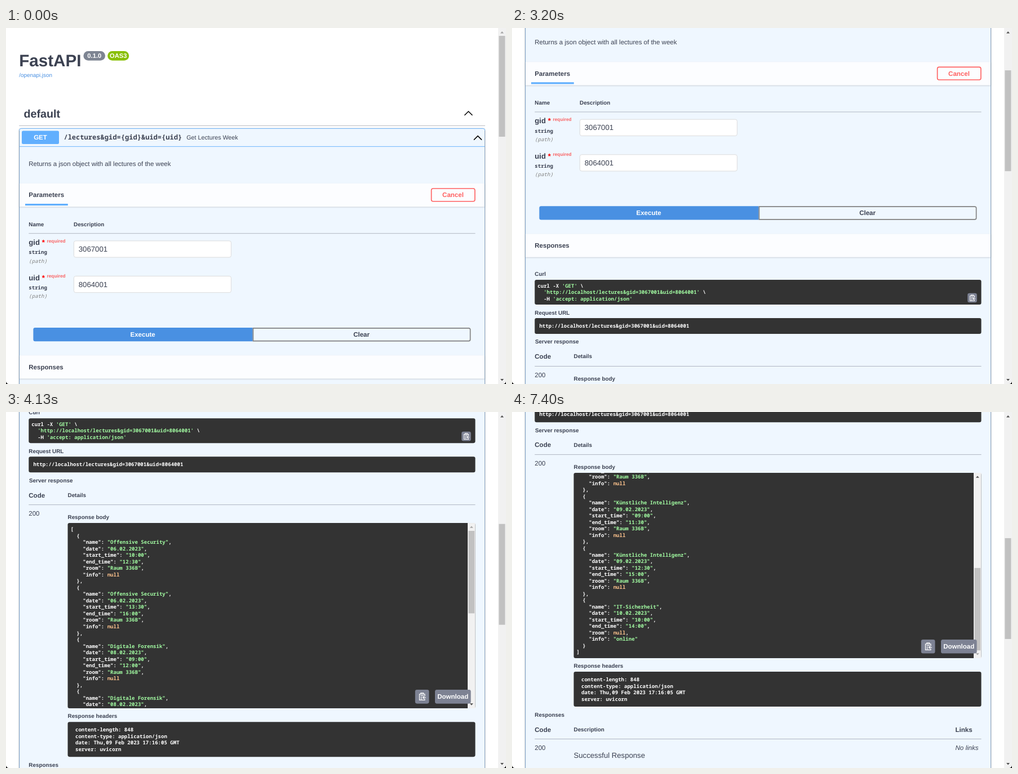
An HTML page that plays this animation: 887x632 px, repeating every 7.47 s.

```html
<!DOCTYPE html>
<html lang="en">
<head>
<meta charset="utf-8">
<title>FastAPI docs</title>
<style>
html, body { margin: 0; width: 100%; height: 100%; overflow: hidden; background: #fff; }
svg { display: block; width: 887px; height: 632px; }
text { font-family: "Liberation Sans", Arial, sans-serif; fill: #3b4151; text-rendering: geometricPrecision; }
.b { font-weight: 700; }
.i { font-style: italic; }
.mid { text-anchor: middle; }
.mono { font-family: "Noto Sans Mono", monospace; }
.white { fill: #fff; }
.str { fill: #a2fca2; }
.nul { fill: #fcc28c; }
.red { fill: #ff6060; }
.req { fill: #f96363; }
.link { fill: #4990e2; }
.gray { fill: #808080; }
</style>
</head>
<body>
<svg id="stage" viewBox="0 0 887 632"></svg>
<script>
const LOOP = 7470, STEP = 1000 / 15;
const SCALE = 0.8232, LINE = 14 * SCALE, CHAR = 5.43, MONO = CHAR / 0.6;
const PAGE_END = 740.6, BODY_END = 349.6, LOADER = 100 * SCALE;
const px = n => +(n * SCALE).toFixed(2);

// ---- drawing helpers ----
const esc = s => s.replace(/&/g, '&amp;');
const text = (s, x, y, size, cls = '') =>
  `<text x="${x}" y="${y}" font-size="${size}" class="${cls}">${s}</text>`;
const sans = (s, x, y, css, cls) => text(esc(s), x, y, px(css), cls);
const code = (s, x, y, cls = 'mono b white') => text(s, x, y, MONO, cls);
const rect = (x, y, w, h, fill, rx = 0, more = '') =>
  `<rect x="${x}" y="${y}" width="${w}" height="${h}" fill="${fill}" rx="${rx}" ${more}/>`;
const rule = (y, x = 40.3, x2 = 832.5, color = '#3b4151" stroke-opacity=".4') =>
  `<path d="M${x} ${y}H${x2}" stroke="${color}" stroke-width=".9"/>`;
const chevron = (x, y) =>
  `<path d="M${x - 7} ${y + 3.6}l7 -7 7 7" fill="none" stroke="#000" stroke-width="1.5"/>`;
const span = (s, cls) => `<tspan class="${cls}">${s}</tspan>`;
const arrow = (id, x, y, dir) =>
  `<path id="${id}" d="M${x - 3} ${y + 1.6 * dir}h6l-3 ${-3.4 * dir}z" fill="#505050"/>`;
const bar = y => rect(24, y + 1, 825, 41.3, '#000', 0, 'opacity=".16" filter="url(#soft)"') +
  rect(24, y, 825, 41.3, '#fcfdff');
const clip = (x, y, k) => `<g transform="translate(${x} ${y}) scale(${k})" fill="none" stroke="#fff" stroke-width="1.3">
  <path d="M5 -1V-5H-5V6H5V4M-2.5 -5V-7H2.5V-5M-3 -2H3M-3 1H0M-3 4H0M7 1.5H1.5M4 -1L1.5 1.5L4 4"/></g>`;

function param(name, value, y) {
  return sans(name, 40.3, y, 16, 'b') +
    `<text x="63.8" y="${y}" font-size="${px(16)}" class="b" style="fill:#f00">*</text>` +
    sans('required', 72.6, y - 4.5, 10, 'b req') +
    code('string', 40.3, y + 16.4, 'mono b') +
    code('(path)', 40.3, y + 31.6, 'mono i gray') +
    rect(120.4, y - 7.1, 279, 29.2, '#fff', 3.3, 'stroke="#d9d9d9" stroke-width=".9"') +
    `<g style="--c:#000">${sans(value, 128.8, y + 12, 16)}</g>`;
}

// ---- response data ----
const room = 'Raum 336B';
const lectures = [
  ['Offensive Security', '06.02.2023', '10:00', '12:30', room, null],
  ['Offensive Security', '06.02.2023', '13:30', '16:00', room, null],
  ['Digitale Forensik', '08.02.2023', '09:00', '12:00', room, null],
  ['Digitale Forensik', '08.02.2023', '12:45', '16:00', room, null],
  ['Künstliche Intelligenz', '09.02.2023', '09:00', '11:30', room, null],
  ['Künstliche Intelligenz', '09.02.2023', '12:30', '15:00', room, null],
  ['IT-Sicherheit', '10.02.2023', '10:00', '14:00', null, 'online']
];
const keys = ['name', 'date', 'start_time', 'end_time', 'room', 'info'];
const json = JSON.stringify(
  lectures.map(row => Object.fromEntries(keys.map((k, i) => [k, row[i]]))), null, 2);

const jsonLines = json.split('\n').map((line, i) => {
  const body = line.trimStart(), indent = line.length - body.length;
  const html = body.replace(/: ("[^"]*"|null)/, (m, v) => ': ' + span(v, v === 'null' ? 'nul' : 'str'));
  return code(html, 114.5 + indent * CHAR, (862.7 + i * LINE).toFixed(2));
}).join('');

const url = esc('http://localhost/lectures&gid=3067001&uid=8064001');
const curl = [
  [0, 'curl -X ' + span("'GET'", 'str') + ' \\'],
  [2, span(`'${url}'`, 'str') + ' \\'],
  [2, '-H ' + span("'accept: application/json'", 'str')]
].map(([n, s], i) => code(s, 45.3 + n * CHAR, 676.4 + i * LINE)).join('');

const headers = ['content-length: 848', 'content-type: application/json',
  'date: Thu,09 Feb 2023 17:16:05 GMT', 'server: uvicorn'
].map((s, i) => code(s, 123, 1218.8 + i * LINE)).join('');

// ---- page ----
const top_ =
  sans('FastAPI', 23.2, 68.3, 36, 'b') +
  rect(137.4, 41, 38.6, 16.8, '#7d8492', 8.4) + text('0.1.0', 156.8, 53.4, 11.2, 'b mid white') +
  rect(180.2, 41, 38, 16.8, '#89bf04', 8.4) + text('OAS3', 199.3, 53.4, 11.2, 'b mid white') +
  sans('/openapi.json', 23.2, 87, 12, 'link') +
  sans('default', 31.4, 159, 24, 'b') + chevron(820.4, 151.4) + rule(173.4, 23.2, 850) +
  rect(23.4, 178.4, 826.2, 1700, '#000', 3.3, 'opacity=".3" filter="url(#soft)"') +
  rect(23.6, 178.4, 825.9, 1700, '#eff7ff', 3.3, 'stroke="#61affe" stroke-width=".9"') +
  `<path d="M23.6 182V1878M849.5 182V1878" stroke="#8a9fb5" stroke-width=".9"/>` +
  rule(210.4, 24, 849, '#61affe') +
  rect(28, 182.6, 66, 23.4, '#61affe', 2.5) + sans('GET', 61, 198.4, 14, 'b mid white') +
  text(esc('/lectures&gid={gid}&uid={uid}'), 102.4, 198.4, 12.07, 'mono b') +
  sans('Get Lectures Week', 320.3, 197.8, 13) + chevron(837, 195) +
  sans('Returns a json object with all lectures of the week', 40.3, 245, 14) +
  bar(276) + sans('Parameters', 40.3, 300.3, 14, 'b') + rect(34, 312, 75.8, 3.2, '#61affe') +
  rect(754, 284.2, 78.4, 24, '#000', 3.3, 'id="cancelGlow" filter="url(#glow)"') +
  rect(754.6, 285, 77.2, 22.7, '#fcfdff', 3, 'stroke="#ff6060" stroke-width="1.65"') +
  sans('Cancel', 793, 300.4, 14, 'b mid red') +
  sans('Name', 40.3, 352.2, 12, 'b') + sans('Description', 120, 352.2, 12, 'b') + rule(364.7) +
  param('gid', '3067001', 385) + param('uid', '8064001', 447.6) +
  `<g id="exec">` + rect(48.4, 532, 389.2, 24.3, '#000', 3.3, 'id="execGlow" filter="url(#glow)"') +
  `<path d="M437.6 532H51.7a3.3 3.3 0 0 0 -3.3 3.3V553a3.3 3.3 0 0 0 3.3 3.3H437.6z" fill="#4990e2"/>` +
  sans('Execute', 242.6, 548.2, 14, 'b mid white') + `</g>` +
  `<path d="M438.4 532.8H821a2.6 2.6 0 0 1 2.6 2.6V553a2.6 2.6 0 0 1 -2.6 2.6H438.4z" fill="#eff7ff" stroke="#808080" stroke-width="1.65"/>` +
  sans('Clear', 630.6, 548.2, 14, 'b mid') +
  `<g id="loader"><circle cx="436.5" cy="614" r="23.9" fill="none" stroke="#555" stroke-opacity=".1" stroke-width="1.65"/>
   <path id="spin" d="M419.6 597.1A23.9 23.9 0 0 1 453.4 597.1" fill="none" stroke="#000" stroke-opacity=".6" stroke-width="1.65"/>` +
  sans('LOADING', 436.5, 617, 10, 'b mid') + `</g>`;

const lower =
  bar(581.2) + sans('Responses', 40.3, 605.8, 14, 'b') +
  sans('Curl', 40.3, 655.8, 12, 'b') + rect(40.3, 662.7, 792.2, 44, '#333', 3.3) + curl +
  rect(808.2, 686.4, 16.6, 16.6, '#7d8293', 3.3) + clip(816.5, 695.2, 0.8) +
  sans('Request URL', 40.3, 724.3, 12, 'b') + rect(40.3, 730.8, 792.2, 28, '#333', 3.3) + code(url, 48.4, 748) +
  sans('Server response', 41, 776.2, 12, 'b') +
  sans('Code', 40.3, 803.1, 14, 'b') + sans('Details', 109.5, 802.2, 12, 'b') + rule(816.2) +
  sans('200', 40.3, 835.4, 14) + sans('Response body', 109.5, 841.8, 12, 'b') +
  rect(109.5, 848.6, 723, 329, '#333', 3.3) +
  `<g clip-path="url(#bodyClip)"><g id="json">${jsonLines}</g></g>` +
  rect(819, 848.6, 13.5, 329, '#f1f1f1') + rect(820.4, 862.6, 10.7, 146.4, '#c1c1c1', 0, 'id="bodyThumb"') +
  arrow('bodyUp', 825.8, 855.8, 1) + arrow('bodyDown', 825.8, 1170.4, -1) +
  rect(725.8, 1144.6, 24.7, 24.6, '#7d8293', 3.3) + clip(738.2, 1157.2, 0.95) +
  rect(761, 1144.6, 63.6, 24.6, '#7d8293', 3.3) + sans('Download', 792.7, 1161, 14, 'b mid white') +
  sans('Response headers', 109.5, 1194.9, 12, 'b') + rect(109.5, 1201.7, 723, 62, '#333', 3.3) + headers +
  sans('Responses', 40.3, 1281.3, 12, 'b') +
  sans('Code', 40.3, 1308.2, 14, 'b') + sans('Description', 109.5, 1307.6, 12, 'b') +
  sans('Links', 786.5, 1308.2, 14, 'b') + rule(1321.1) +
  sans('200', 40.3, 1340.5, 14) + sans('Successful Response', 109.5, 1354.2, 16) +
  sans('No links', 786.5, 1340.2, 14, 'i');

const stage = document.getElementById('stage');
stage.innerHTML = `<defs>
  <filter id="soft" x="-5%" y="-20%" width="110%" height="140%"><feGaussianBlur stdDeviation="1"/></filter>
  <filter id="glow" x="-20%" y="-60%" width="140%" height="220%"><feGaussianBlur stdDeviation="2"/></filter>
  <clipPath id="bodyClip"><rect x="109.5" y="848.6" width="709.5" height="329"/></clipPath></defs>
  <rect width="887" height="632" fill="#fff"/>
  <g id="page">${top_}<g id="lower">${lower}</g></g>` +
  rect(873, 0, 14, 632, '#f1f1f1') + rect(874.4, 14, 11, 179, '#c1c1c1', 0, 'id="thumb"') +
  arrow('up', 880, 7.8, 1) + arrow('down', 880, 624.6, -1) +
  `<path d="M0 627.5Q.6 631.4 4.5 632H0zM887 627.5Q886.4 631.4 882.5 632H887z" fill="#000"/>`;
const el = {};
stage.querySelectorAll('[id]').forEach(n => el[n.id] = n);
const set = (id, name, v) => el[id].setAttribute(name, v);

// ---- motion ----
// CSS "ease" timing
function ease(p) {
  if (p <= 0) return 0;
  if (p >= 1) return 1;
  const bez = (u, a, b) => 3 * u * (1 - u) * (1 - u) * a + 3 * u * u * (1 - u) * b + u * u * u;
  let lo = 0, hi = 1;
  for (let i = 0; i < 20; i++) {
    const m = (lo + hi) / 2;
    if (bez(m, 0.25, 0.25) < p) lo = m; else hi = m;
  }
  return bez(lo, 0.1, 1);
}
const fade = (t, start) => ease((t - start) / 300);
const hover = (t, enter, leave) => 0.3 * (fade(t, enter) - fade(t, leave));

// Cubic path through points of [time, value, speed]
function glide(points, t) {
  if (t <= points[0][0]) return points[0][1];
  for (let i = 1; i < points.length; i++) {
    const [t0, a, va] = points[i - 1], [t1, b, vb] = points[i];
    if (t < t1) {
      const d = t1 - t0, u = (t - t0) / d, w = 1 - u;
      return a * (1 + 2 * u) * w * w + b * u * u * (3 - 2 * u) + d * u * w * (va * w - vb * u);
    }
  }
  return points[points.length - 1][1];
}
const pageScroll = [[2620, 0, 0.2], [3200, 215.7, 0.42], [3933, 531.6, 0.5], [4332, PAGE_END, 0.2]];
const bodyScroll = [[4750, 0, 0], [4800, 13, 0.6], [4930, 82.3, 0.1], [4935, 82.3, 0],
  [5003, 82.3, 0.25], [5733, BODY_END, 0.15]];

const LOAD_ON = 1862, LOAD_OFF = 2235;

function draw(time) {
  const t = Math.floor((time % LOOP + 4) / STEP) * STEP;
  const loading = t >= LOAD_ON && t < LOAD_OFF;
  const y = glide(pageScroll, t), inner = glide(bodyScroll, t);

  set('page', 'transform', `translate(0 ${-y})`);
  set('lower', 'transform', `translate(0 ${loading ? LOADER : 0})`);
  set('loader', 'visibility', loading ? 'visible' : 'hidden');
  set('spin', 'transform', `rotate(${(t - LOAD_ON) * 0.36} 436.5 614)`);

  set('cancelGlow', 'opacity', hover(t, 255, 790));
  set('execGlow', 'opacity', hover(t, 1520, 2690));
  set('exec', 'opacity', 1 - 0.7 * (fade(t, LOAD_ON) - fade(t, LOAD_OFF)));

  set('thumb', 'y', 14 + y * 0.2835);
  set('thumb', 'height', loading ? 172.4 : 179);
  set('up', 'fill', y > 0 ? '#505050' : '#a3a3a3');

  set('json', 'transform', `translate(0 ${-inner})`);
  set('bodyThumb', 'y', 862.6 + inner * 0.443);
  set('bodyUp', 'fill', inner > 0 ? '#505050' : '#a3a3a3');
  set('bodyDown', 'fill', inner < BODY_END ? '#505050' : '#a3a3a3');
}

const began = performance.now();
function tick() {
  draw(performance.now() - began);
  requestAnimationFrame(tick);
}
tick();
</script>
</body>
</html>
```
